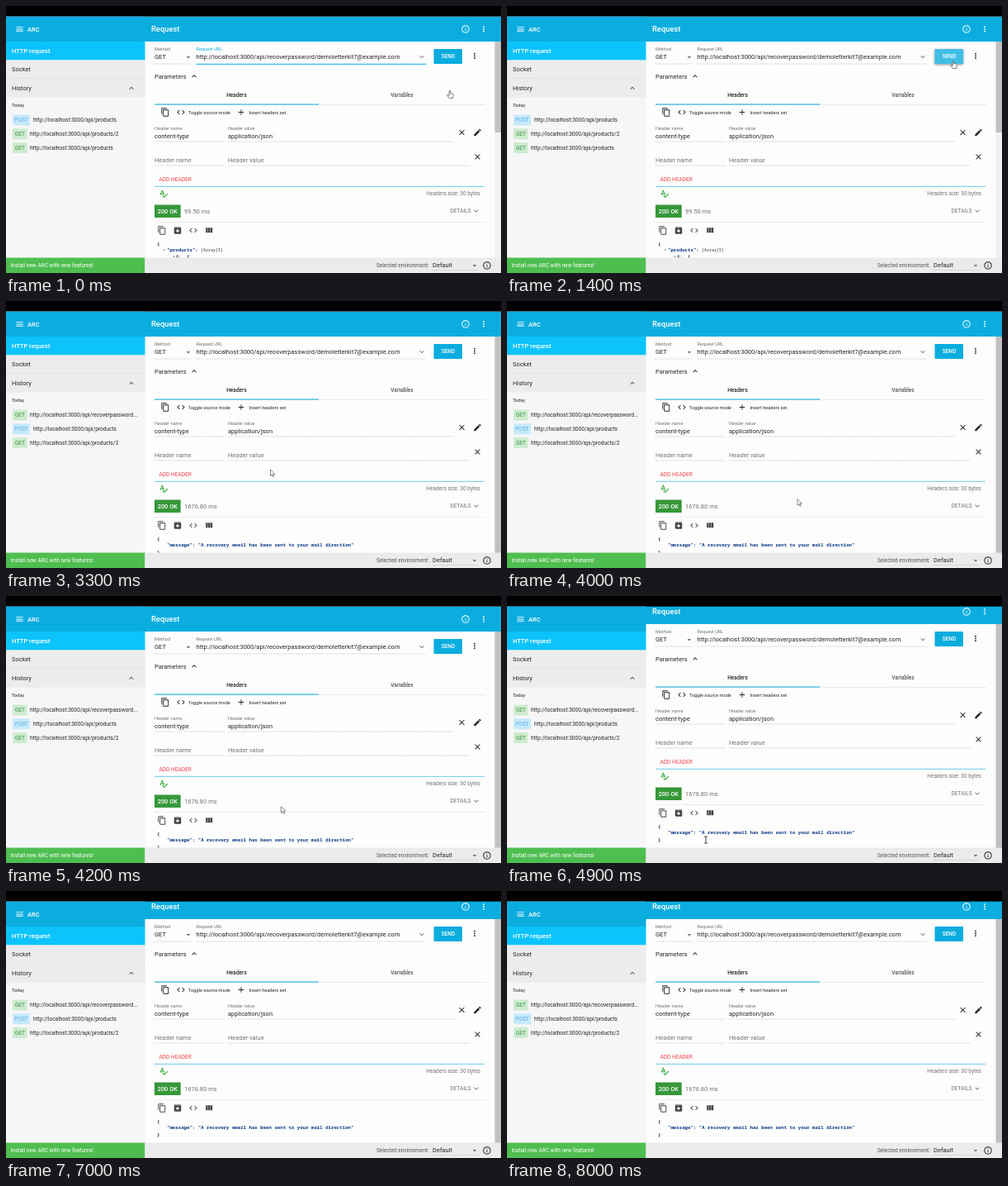
These frames come from a looping animation (600x323 px, 8.1 s). An HTML page:

```html
<!DOCTYPE html>
<html lang="en">
<head>
<meta charset="utf-8">
<title>Request</title>
<style>
html, body { margin: 0; width: 100%; height: 100%; overflow: hidden; background: #fdfdfd; }
svg { display: block; width: 600px; height: 323px; }
text { font-family: Roboto, sans-serif; white-space: pre; }
text.mono { font-family: "Noto Sans Mono", "Liberation Mono", monospace; }
</style>
</head>
<body>
<svg viewBox="0 0 600 323">
  <g id="page"><g id="main"></g><g id="bar"></g></g>
  <g id="frame"></g>
  <g id="pointer"></g>
</svg>
<script>
const LOOP = 8100, STEP = 100;
const PRESS = 1300, SENT = 1500, DONE = 3300, SCROLL = 4400;
const BLUE = '#0badde', INK = '#262626', GREY = '#737373', NAVY = '#0d3a86';
const SIDE = 168.5, FOOT = 304.5;
const URL_TEXT = 'http://localhost:3000/api/recoverpassword/demoletterkit7@example.com';
const $ = id => document.getElementById(id);

// Icon outlines on a 24-unit grid
const icons = {
  menu: 'M3 18h18v-2H3v2zm0-5h18v-2H3v2zm0-7v2h18V6H3z',
  more: 'M12 8c1.1 0 2-.9 2-2s-.9-2-2-2-2 .9-2 2 .9 2 2 2zm0 2c-1.1 0-2 .9-2 2s.9 2 2 2 2-.9 2-2-.9-2-2-2zm0 6c-1.1 0-2 .9-2 2s.9 2 2 2 2-.9 2-2-.9-2-2-2z',
  info: 'M11 17h2v-6h-2v6zm1-15C6.48 2 2 6.48 2 12s4.48 10 10 10 10-4.48 10-10S17.52 2 12 2zm0 18c-4.41 0-8-3.59-8-8s3.59-8 8-8 8 3.59 8 8-3.59 8-8 8zM11 9h2V7h-2v2z',
  down: 'M16.59 8.59L12 13.17 7.41 8.59 6 10l6 6 6-6z',
  up: 'M12 8l-6 6 1.41 1.41L12 10.83l4.59 4.58L18 14z',
  drop: 'M7 10l5 5 5-5z',
  copy: 'M16 1H4c-1.1 0-2 .9-2 2v14h2V3h12V1zm3 4H8c-1.1 0-2 .9-2 2v14c0 1.1.9 2 2 2h11c1.1 0 2-.9 2-2V7c0-1.1-.9-2-2-2zm0 16H8V7h11v14z',
  code: 'M9.4 16.6L4.8 12l4.6-4.6L8 6l-6 6 6 6 1.4-1.4zm5.2 0l4.6-4.6-4.6-4.6L16 6l6 6-6 6-1.4-1.4z',
  add: 'M19 13h-6v6h-2v-6H5v-2h6V5h2v6h6v2z',
  close: 'M19 6.4L17.6 5 12 10.6 6.4 5 5 6.4 10.6 12 5 17.6 6.4 19 12 13.4 17.6 19 19 17.6 13.4 12z',
  edit: 'M3 17.25V21h3.75L17.81 9.94l-3.75-3.75L3 17.25zM20.71 7.04c.39-.39.39-1.02 0-1.41l-2.34-2.34c-.39-.39-1.02-.39-1.41 0l-1.83 1.83 3.75 3.75 1.83-1.83z',
  spell: 'M12.45 16h2.09L9.43 3H7.57L2.46 16h2.09l1.12-3h5.64l1.14 3zm-6.02-5L8.5 5.48 10.57 11H6.43zm15.16.59l-8.09 8.09L9.83 16l-1.41 1.41 5.09 5.09L23 13l-1.41-1.41z',
  archive: 'M20.54 5.23l-1.39-1.68C18.88 3.21 18.47 3 18 3H6c-.47 0-.88.21-1.16.55L3.46 5.23C3.17 5.57 3 6.02 3 6.5V19c0 1.1.9 2 2 2h14c1.1 0 2-.9 2-2V6.5c0-.48-.17-.93-.46-1.27zM12 17.5L6.5 12H10v-2h4v2h3.5L12 17.5zM5.12 5l.81-1h12l.94 1H5.12z',
  columns: 'M10 18h5V5h-5v13zm-6 0h5V5H4v13zM16 5v13h5V5h-5z'
};

const rect = (x, y, w, h, fill, more = '') =>
  `<rect x="${x}" y="${y}" width="${w}" height="${h}" fill="${fill}" ${more}/>`;
const text = (x, cy, str, size = 7.5, fill = INK, more = '') =>
  `<text x="${x}" y="${cy + size * .36}" font-size="${size}" fill="${fill}" ${more}>${str}</text>`;
const mono = (x, cy, str, fill = NAVY, size = 5.73) =>
  text(x, cy, str, size, fill, 'class="mono" font-weight="600"');
const icon = (name, cx, cy, fill = INK) =>
  `<path d="${icons[name]}" fill="${fill}" transform="translate(${cx - 5.63} ${cy - 5.63}) scale(.469)"/>`;
const dots = (x1, x2, y) =>
  `<path d="M${x1} ${y}H${x2}" stroke="#aaa" stroke-width=".6" stroke-dasharray="1 .8"/>`;
const bold = 'font-weight="500"', centred = bold + ' text-anchor="middle"';

function header() {
  return rect(168, 13, 432, 30, BLUE) +
    text(176, 28, 'Request', 9.4, '#fff', bold) +
    icon('info', 557, 28, '#fff') + icon('more', 579, 28, '#fff');
}

function requestForm(s) {
  // Without the scrollbar the form is 8 wider
  const d = s.loading ? 8 : 0, right = 581 + d, half = 379 + d / 2;
  const button = rect(518.5 + d, 52, 34.5, 18, s.pressed ? '#41bee6' : BLUE,
    s.pressed ? 'rx="1" style="filter:drop-shadow(0 1.5px 1.5px #0007)"' : 'rx="1"');
  return text(180, 51.5, 'Method', 5.6, GREY) + text(180, 61.5, 'GET') +
    icon('drop', 221, 62, GREY) + dots(180, 225, 70) +
    text(230.5, 51.5, 'Request URL', 5.6, s.focus ? BLUE : GREY) + text(230.5, 61.5, URL_TEXT) +
    icon('down', 504 + d, 61.5, GREY) +
    (s.focus ? rect(230.5, 69.8, 279, 1, BLUE) : dots(230.5, 509 + d, 70)) +
    button + text(536 + d, 61, s.loading ? 'ABORT' : 'SEND', 6.56, '#fff', centred) +
    icon('more', 568 + d, 60.5) +
    text(180, 85.5, 'Parameters') + icon('up', 228, 85) +
    text(half - 99.5, 107.5, 'Headers', 6.56, INK, centred) +
    text(480 + d * .75, 107.5, 'Variables', 6.56, '#555', centred) +
    rect(180, 119, right - 180, .6, '#ddd') + rect(180, 118.5, half - 180, 1, BLUE) +
    icon('copy', 193, 128.5) + icon('code', 212, 128.5) + text(221, 128.5, 'Toggle source mode', 5.6) +
    icon('add', 285, 128.5) + text(294.5, 128.5, 'Insert headers set', 5.6) +
    text(180, 147.5, 'Header name', 5.6, GREY) + text(269, 147.5, 'Header value', 5.6, GREY) +
    text(180, 157, 'content-type') + text(269, 157, 'application/json') +
    dots(180, 265, 164) + dots(269, 543 + d, 164) +
    icon('close', 552.5 + d, 153) + icon('edit', 571.5 + d, 153) +
    text(180, 186.5, 'Header name', 7.5, GREY) + text(269, 186.5, 'Header value', 7.5, GREY) +
    dots(180, 265, 193) + dots(269, 562 + d, 193) + icon('close', 571.5 + d, 182.5) +
    text(185.5, 209.6, 'ADD HEADER', 6.56, '#f0454f') +
    rect(180, 217.8, right - 181, 1, '#6ccbe8') +
    icon('spell', 191, 227, '#1fa02a') +
    text(575 + d, 226.5, 'Headers size: 30 bytes', 6.56, GREY, 'text-anchor="end"');
}

function response(s) {
  const body = s.done
    ? mono(183, 288, '{', INK) +
      mono(195, 295.3, '"message": "A recovery email has been sent to your mail direction"') +
      mono(183, 304, '}', INK)
    : mono(183, 288, '{', INK) + mono(190.5, 295, '▾', INK, 5) + mono(195, 295, '"products":') +
      mono(236, 295, '[Array[5]', '#777', 5) +
      mono(202, 302.8, '▾', INK, 5) + mono(206, 302.8, '0:', '#777') + mono(219, 302.8, '{', INK);
  return rect(180, 240.5, 31.7, 15.5, '#36983a') + text(183.7, 248, '200 OK', 7.4, '#fff', bold) +
    text(216, 248, s.done ? '1676.80 ms' : '99.50 ms', 7.5, GREY) +
    text(538.5, 248, 'DETAILS', 6.56, GREY) + icon('down', 570, 248, GREY) +
    rect(180, 261, 401, .6, '#e3e3e3') +
    ['copy', 'archive', 'code', 'columns'].map((n, i) => icon(n, 189 + 19 * i, 271.5, '#444')).join('') +
    body;
}

function scrollbar(s) {
  return rect(592.5, 13, 7.5, 292, '#f1f1f1') +
    rect(592.5, s.scrolled ? 22 : 13, 7.5, s.done ? 292 : 140, '#c1c1c1');
}

function historyRow(cy, verb, path) {
  const post = verb == 'POST', w = post ? 21 : 17.5;
  return rect(8, cy - 6.5, w, 13, post ? '#c8e9fc' : '#cdebcf', 'rx="1"') +
    text(8 + w / 2, cy, verb, 6.56, post ? '#55aee4' : '#3c9142', 'text-anchor="middle"') +
    text(post ? 33 : 29, cy, 'http://localhost:3000/api/' + path, 6.56);
}

function frame(s) {
  const rows = [['POST', 'products'], ['GET', 'products/2'], ['GET', 'products']];
  if (s.done) {
    rows.unshift(['GET', 'recoverpassword...']);
    rows.pop();
  }
  return rect(0, 0, 600, 12.7, '#000') +
    rect(0, 43, SIDE, 262, '#f6f6f6') +
    rect(0, 12.7, SIDE, 30.3, BLUE) + icon('menu', 16.5, 28, '#fff') + text(26, 28, 'ARC', 7.5, '#fff', bold) +
    rect(0, 43, SIDE, 22.5, '#0dc3fb') + text(7, 54.5, 'HTTP request', 7.5, '#fff', bold) +
    rect(0, 65.5, SIDE, 45, '#ececec') + rect(0, 87.5, SIDE, .6, '#e0e0e0') +
    text(7, 76.5, 'Socket') + text(7, 99.5, 'History') + icon('up', 152, 99.5, '#555') +
    text(7, 119.5, 'Today', 5.6, '#4a4a4a', bold) +
    rows.map((r, i) => historyRow(138 + 16.8 * i, ...r)).join('') +
    rect(0, FOOT, SIDE, 19, '#4fbe50') + text(5.5, 314, 'Install new ARC with new features!', 6.56, '#fff') +
    rect(SIDE, FOOT, 600 - SIDE, 19, '#ebebeb') + text(449, 314, 'Selected environment:', 6.45, '#555') +
    text(517, 313.5, 'Default') + dots(517, 572, 319.5) +
    icon('drop', 568, 314, GREY) + icon('info', 583, 314);
}

// Indeterminate bar: slides in, a gap crosses it, then it shrinks to the right
function progress(t) {
  const p = (t - 1432) / 2000 % 1, x = 180, w = 409;
  const part = (a, b, fill) => {
    a = Math.max(a, x);
    b = Math.min(b, x + w);
    return b > a ? rect(a, 235, b - a, 2, fill) : '';
  };
  const head = x + w * Math.min(1, p * 2);
  const tail = p > .75 ? x + w * (1 - ((1 - p) / .25) ** 2) : x;
  const gap = Math.min(1, Math.max(0, (p - .3) / .6)) ** 1.18;
  const mid = x + w / 2 + w * .9375 * (2 * gap - 1);
  return part(x, x + w, '#e8e8e8') + part(tail, head, BLUE) +
    part(mid - w * .375, mid + w * .375, '#e8e8e8');
}

// Pointer: time, x, y
const path = [
  [0, 538, 102], [300, 538, 102], [900, 541, 66], [1800, 541, 66], [2700, 320.5, 204],
  [3300, 320.5, 204], [4000, 352, 239.5], [4400, 315, 270], [4900, 241, 295],
  [6000, 342, 295], [6300, 606, 308]
];
const shapes = {
  arrow: '<path d="M0 0V7.6L1.8 6 3 8.7 4.3 8.1 3.1 5.5H5.4Z" fill="#fff" stroke="#555" stroke-width=".7"/>',
  hand: '<path d="M-.8 .6Q0-.4 .8 .6V3.6L3.6 4.2Q4.4 4.5 4.3 5.5L3.6 9.6H-.6L-3.3 6.2Q-3.2 5-2.2 5.4L-.8 6.4Z" fill="#fff" stroke="#444" stroke-width=".7"/>',
  beam: '<path d="M-2-4H-.5L0-3.6 .5-4H2M0-3.6V3.6M-2 4H-.5L0 3.6 .5 4H2" fill="none" stroke="#222" stroke-width=".9"/>'
};

function pointer(t) {
  const i = path.findIndex(k => k[0] > t);
  if (i < 0) return '';
  const [t0, x0, y0] = path[i - 1], [t1, x1, y1] = path[i], u = (t - t0) / (t1 - t0);
  const x = x0 + (x1 - x0) * u, y = y0 + (y1 - y0) * u;
  const kind = t < 1900 ? (y > 97 || y < 70 ? 'hand' : 'arrow') : t < 4700 ? 'arrow' : 'beam';
  return `<g transform="translate(${x} ${y})">${shapes[kind]}</g>`;
}

let lastKey;
function draw(now) {
  const t = Math.floor(now % LOOP / STEP) * STEP;
  const s = {
    focus: t < PRESS,
    pressed: t >= PRESS && t < SENT,
    loading: t >= SENT && t < DONE,
    done: t >= DONE,
    scrolled: t >= SCROLL
  };
  const key = JSON.stringify(s);
  if (key != lastKey) {
    lastKey = key;
    const shifted = inner => `<g transform="translate(0 ${s.scrolled ? -9 : 0})">${inner}</g>`;
    $('main').innerHTML = shifted(requestForm(s) + (s.loading ? '' : response(s))) +
      (s.loading ? '' : scrollbar(s)) + shifted(header());
    $('frame').innerHTML = frame(s);
  }
  $('bar').innerHTML = s.loading ? progress(t) : '';
  $('pointer').innerHTML = pointer(t);
}

const start = performance.now();
function tick() {
  draw(performance.now() - start);
  requestAnimationFrame(tick);
}
tick();
</script>
</body>
</html>
```
